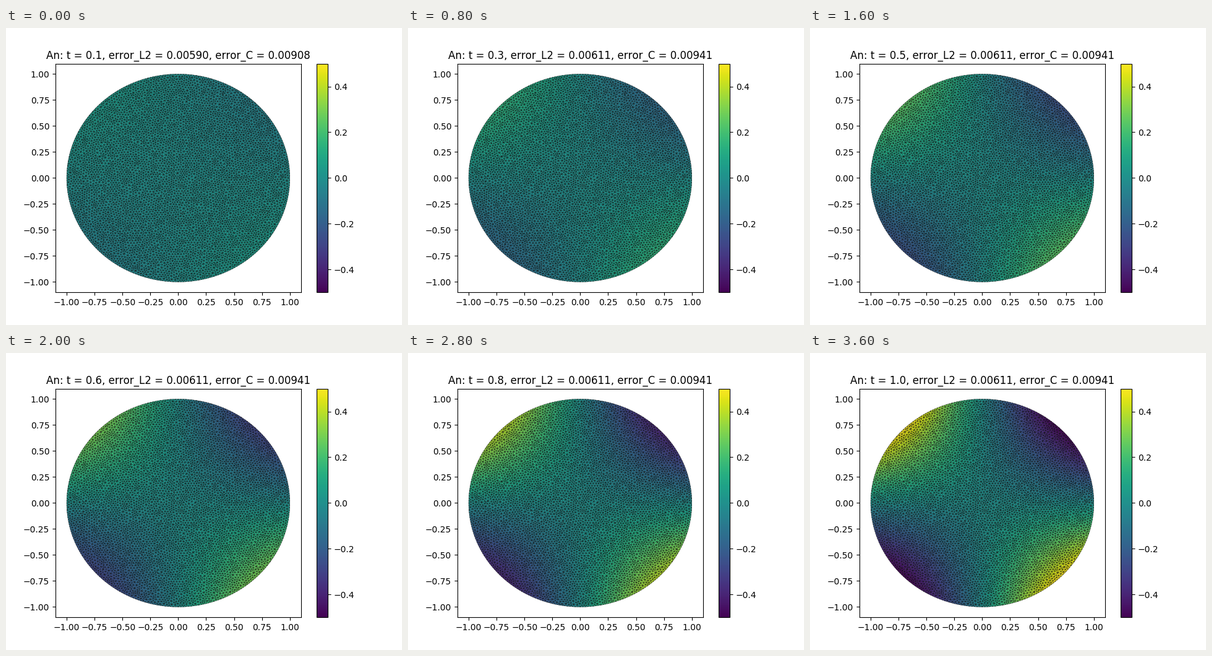
Write a matplotlib script that moves like this. It is 640 by 480 pixels and loops after 4000 ms.

```python
import numpy as np
import matplotlib.pyplot as plt
from matplotlib.animation import FuncAnimation
from matplotlib.tri import Triangulation

FRAMES = 10
INTERVAL = 400
RIM_POINTS = 272
MIN_DIST = 0.017

plt.rcParams["text.kerning_factor"] = 6  # whole-pixel kerning


def scatter_points(rng, tries=100000):
    """Rim points followed by evenly spread random points inside the disc."""
    angle = np.linspace(0, 2 * np.pi, RIM_POINTS, endpoint=False)
    rim = np.column_stack([np.cos(angle), np.sin(angle)])
    candidates = rng.uniform(-1, 1, (tries, 2))
    candidates = candidates[np.hypot(*candidates.T) < 1 - 0.8 * MIN_DIST]

    points, cells = [], {}
    for x, y in candidates.tolist():
        i, j = int(x // MIN_DIST), int(y // MIN_DIST)
        near = (p for a in (i - 1, i, i + 1) for b in (j - 1, j, j + 1)
                for p in cells.get((a, b), ()))
        if all((x - px) ** 2 + (y - py) ** 2 >= MIN_DIST ** 2 for px, py in near):
            points.append((x, y))
            cells.setdefault((i, j), []).append((x, y))
    return np.vstack([rim, points])


def disc_mesh(rounds=6):
    """Triangulate the disc, smoothing the inner vertices."""
    points = scatter_points(np.random.default_rng(7))
    for _ in range(rounds):
        a, b = Triangulation(*points.T).edges.T
        total = np.zeros_like(points)
        np.add.at(total, a, points[b])
        np.add.at(total, b, points[a])
        degree = np.bincount(np.r_[a, b], minlength=len(points))
        mean = total / degree[:, None]
        points[RIM_POINTS:] = mean[RIM_POINTS:]
    return Triangulation(*points.T)


def title_text(step):
    settled = 1 - 0.0347 ** step
    return (f"An: t = {step / 10:.1f}, error_L2 = {0.00611 * settled:.5f}, "
            f"error_C = {0.00941 * settled:.5f}")


mesh = disc_mesh()
shape = (-mesh.x * mesh.y)[mesh.triangles].mean(axis=1)

fig, ax = plt.subplots(figsize=(6.4, 4.8), dpi=100)
field = ax.tripcolor(mesh, facecolors=0.1 * shape, edgecolors="k",
                     cmap="viridis", vmin=-0.5, vmax=0.5)
fig.colorbar(field, ax=ax, ticks=np.linspace(-0.4, 0.4, 5))
ticks = np.linspace(-1, 1, 9)
ax.set(xlim=(-1.1, 1.1), ylim=(-1.1, 1.1), xticks=ticks, yticks=ticks)
title = ax.set_title(title_text(1))


def update(frame):
    step = frame + 1
    field.set_array(step / 10 * shape)
    title.set_text(title_text(step))
    return field, title


anim = FuncAnimation(fig, update, frames=FRAMES, interval=INTERVAL,
                     repeat=True, repeat_delay=0)
plt.show()
```
